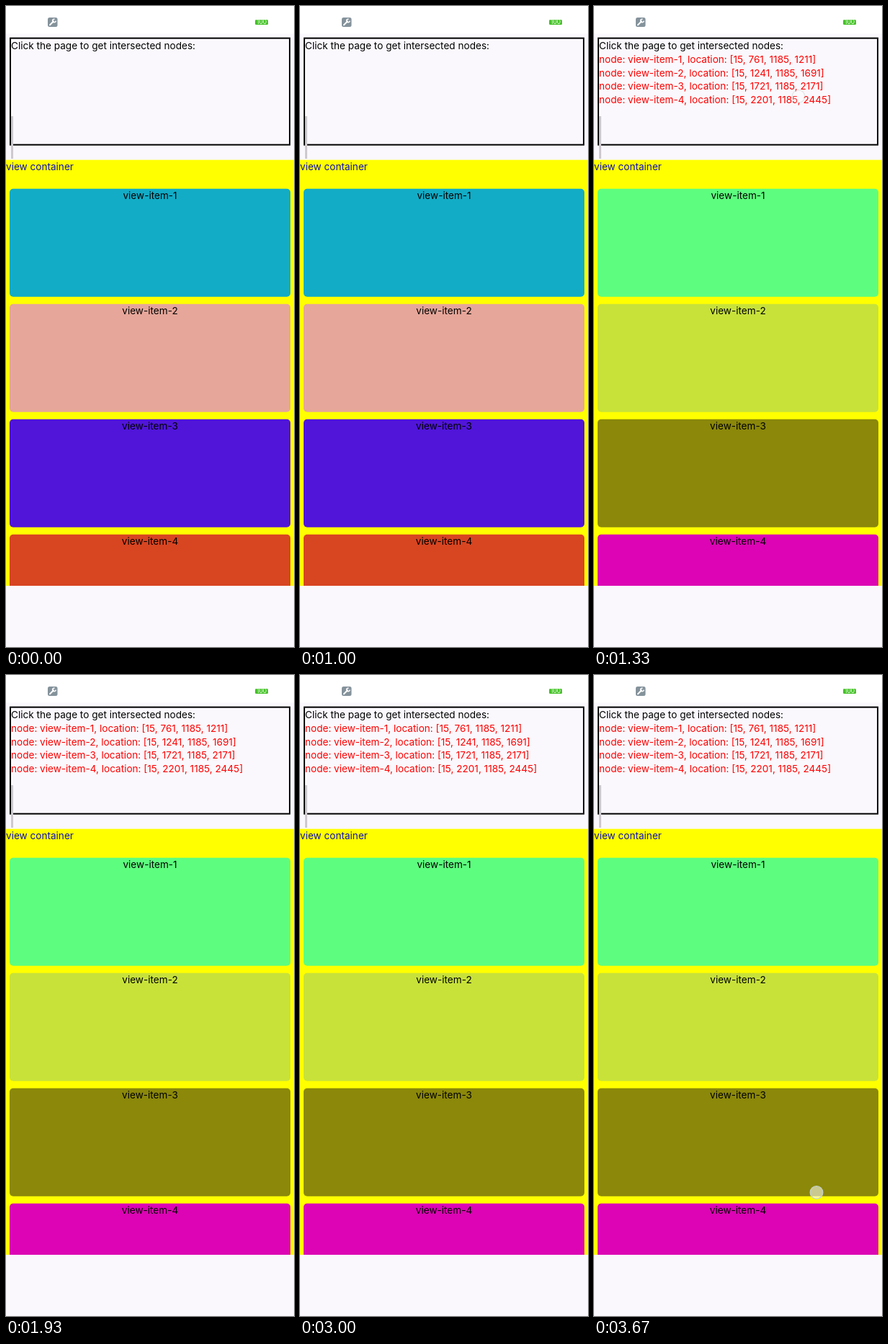
An HTML page for the animation above (3740 ms loop, 400 by 890 pixels).

```html
<!DOCTYPE html>
<html lang="en">
<head>
<meta charset="utf-8">
<title>Intersected nodes</title>
<style>
  html, body { margin: 0; height: 100%; overflow: hidden; background: #faf8fc; }
  svg { display: block; width: 100%; height: 100%; }
  text { font: 13.58px Inter, sans-serif; }
  .item { text-anchor: middle; }
  #report { fill: #f00; }
</style>
</head>
<body>
<svg viewBox="0 0 400 890">
  <rect width="400" height="890" fill="#faf8fc"/>
  <rect width="400" height="38.67" fill="#fff"/>

  <!-- status bar -->
  <rect x="58" y="16" width="13.5" height="13" rx="2.5" fill="#84929b"/>
  <path d="M61 26.2 66 21.2" stroke="#fff" stroke-width="2" stroke-linecap="round"/>
  <path d="M67.6 18.3A2.3 2.3 0 1 0 69.2 20.6" fill="none" stroke="#fff" stroke-width="1.5"/>
  <rect x="346" y="19" width="18" height="7" rx="1.5" fill="#43c225"/>
  <text x="355" y="25.4" text-anchor="middle" fill="#fff" style="font-size:8.4px">100</text>

  <!-- report box -->
  <rect x="6" y="44.67" width="388" height="148" fill="none" stroke="#000" stroke-width="2"/>
  <text x="7" y="60.3">Click the page to get intersected nodes:</text>
  <g id="report"></g>
  <rect x="7" y="153" width="3" height="59" fill="#ccc9ce"/>

  <!-- container -->
  <rect y="213.67" width="400" height="591.33" fill="#ff0"/>
  <text x="0" y="228.3" fill="#1010b0">view container</text>
  <clipPath id="view"><rect y="213.67" width="400" height="591.33"/></clipPath>
  <g id="items" clip-path="url(#view)"></g>

  <circle id="touch" r="8.8" fill="#fff" fill-opacity=".55" stroke="#c4d0c8" stroke-width="1.3"/>
</svg>
<script>
const LOOP = 3740, TAP = 1330;
const before = ['#12acc6', '#e6a699', '#5015d9', '#d84521'];
const after = ['#5dfe7f', '#c8e23a', '#8b880a', '#dc04b4'];
const bottoms = [1211, 1691, 2171, 2445];

const report = document.getElementById('report');
const items = document.getElementById('items');
const touch = document.getElementById('touch');

function add(parent, tag, attributes, text = '') {
  const node = document.createElementNS(parent.namespaceURI, tag);
  for (const name in attributes) node.setAttribute(name, attributes[name]);
  node.textContent = text;
  return parent.appendChild(node);
}

const cards = bottoms.map((bottom, i) => {
  const name = `view-item-${i + 1}`, top = 761 + 480 * i, y = top / 3;
  add(report, 'text', { x: 7, y: 79 + 18.6 * i },
    `node: ${name}, location: [15, ${top}, 1185, ${bottom}]`);
  const card = add(items, 'rect', { x: 5, y, width: 390, height: 150, rx: 5 });
  add(items, 'text', { class: 'item', x: 200, y: y + 14.6 }, name);
  return card;
});

function showTouch(x, y, opacity) {
  touch.setAttribute('transform', `translate(${x} ${y})`);
  touch.setAttribute('opacity', opacity);
}

function draw(now) {
  const t = now % LOOP, tapped = t >= TAP;
  report.setAttribute('visibility', tapped ? 'visible' : 'hidden');
  cards.forEach((card, i) => card.setAttribute('fill', (tapped ? after : before)[i]));

  if (t >= 3670) showTouch(309, 718.5, 1);
  else if (t >= 1200 && t < 1400) showTouch(284, 125.5, tapped ? 0.4 : 1);
  else showTouch(0, 0, 0);
}

function tick() {
  draw(performance.now());
  requestAnimationFrame(tick);
}
tick();
</script>
</body>
</html>
```
